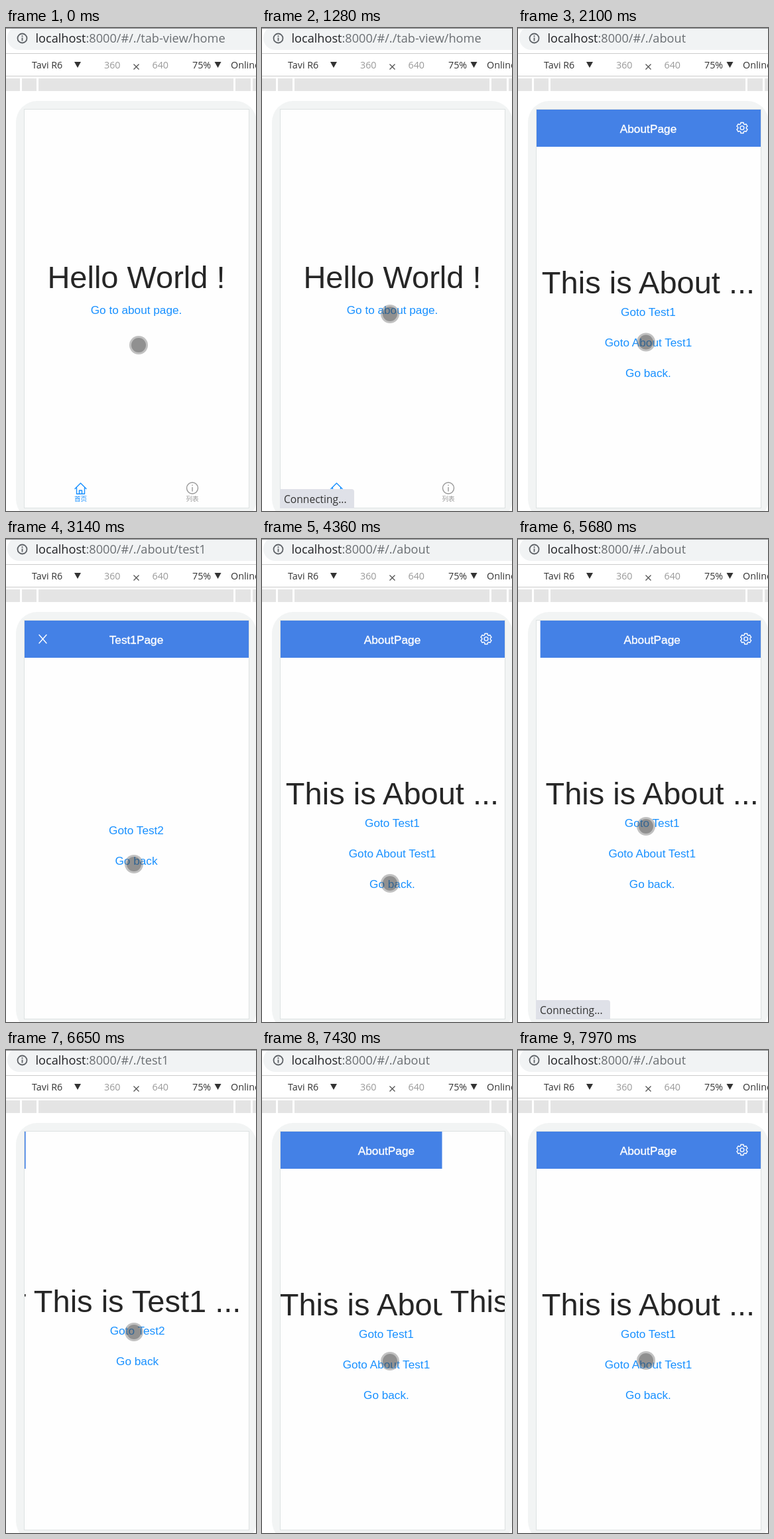
Recreate the animation shown at these times as an HTML page. Size 377 by 728 pixels, loop 8000 ms.

```html
<!DOCTYPE html>
<html lang="en">
<head>
<meta charset="utf-8">
<title>Page transitions</title>
<style>
  html, body { margin: 0; width: 100%; height: 100%; overflow: hidden; background: #fff; }
  svg { display: block; width: 100vw; height: 100vh; }
  text { white-space: pre; }
  .ui { font-family: "Open Sans", "Noto Sans", sans-serif; font-size: 14.3px; fill: #333; }
  .ui .dim { fill: #999; }
  .url { font-size: 18.15px; fill: #6a6e72; font-kerning: none; }
  .url .host { fill: #202124; }
  .page text { font-family: "Liberation Sans", Arial, sans-serif; text-anchor: middle; }
  .page .big { font-size: 47px; fill: #262626; }
  .page .link { font-size: 17.2px; fill: #1890ff; }
  .page .title { font-size: 17.3px; fill: #fff; stroke: #fff; stroke-width: .35; }
  .page .tab { font-family: "Noto Sans CJK SC", "Noto Sans CJK", sans-serif; font-size: 9.6px; font-weight: 500; }
  .icon { fill: none; stroke-width: 1.4; stroke-linejoin: round; stroke-linecap: round; }
</style>
</head>
<body>
<svg viewBox="0 0 377 728" preserveAspectRatio="none">
  <defs>
    <clipPath id="screen"><rect x="28" y="123" width="338" height="600"/></clipPath>
  </defs>
  <rect width="377" height="728" fill="#fff"/>

  <!-- Browser bar -->
  <rect x="2" y="-3" width="420" height="36" rx="18" fill="#f1f3f4"/>
  <rect width="377" height="1" fill="#85878a"/>
  <g fill="none" stroke="#5f6368" stroke-width="1.8">
    <circle cx="24.5" cy="15.5" r="7"/>
    <path d="M24.5 14.5v5M24.5 11.2v2"/>
  </g>
  <text class="ui url" x="44.5" y="22"><tspan class="host">localhost</tspan><tspan id="path"></tspan></text>

  <!-- Device toolbar -->
  <path d="M0 38.5H377M0 72.5H377" stroke="#cbcbcb"/>
  <g class="ui">
    <text x="39" y="61">Tavi R6</text>
    <text class="dim" x="148" y="61">360</text>
    <text class="dim" x="220.5" y="61">640</text>
    <text x="281" y="61">75%</text>
    <text x="339" y="61">Online</text>
    <path d="M103 51h10l-5 9zM314.5 51h10l-5 9z"/>
    <path d="M192.5 54.5l8 8m0-8l-8 8" stroke="#555" stroke-width="1.3"/>
  </g>
  <path d="M0 76h21v19H0zM24 76h22v19H24zM49 76h294v19H49zM346 76h23v19H346zM372 76h5v19h-5z" fill="#e4e4e4"/>

  <!-- Phone -->
  <rect x="15" y="110" width="363" height="632" rx="32" fill="#f2f4f4"/>
  <rect x="27.5" y="122.5" width="339" height="601" fill="#fefefe" stroke="#dde2e2"/>
  <g id="pages" clip-path="url(#screen)"></g>

  <g id="status" class="ui">
    <path d="M27 695h108q4 0 4 4v25H27z" fill="#dfe1e8"/>
    <text x="33" y="716" style="font-size:15.6px">Connecting...</text>
  </g>
  <g id="cursor">
    <circle r="14" fill="#787878" fill-opacity=".45"/>
    <circle r="11" fill="#000" fill-opacity=".25"/>
  </g>
</svg>

<script>
const LOOP = 8000, STEP = 60, SLIDE = 250, WIDTH = 338, PARALLAX = 0.096;
const $ = id => document.getElementById(id);

const text = (cls, y, str, x = 196.5, extra = '') =>
  `<text class="${cls}" x="${x}" y="${y}" ${extra}>${str}</text>`;
const link = (y, str) => text('link', y, str);
const header = (title, icon) =>
  `<rect x="28" y="123" width="338" height="56" fill="#4481e6"/>` +
  text('title', 158, title) + `<g class="icon" stroke="#fff">${icon}</g>`;

function gear(cx, cy) {
  const points = [];
  for (let tooth = 0; tooth < 6; tooth++) {
    for (const [turn, r] of [[-21, 6.4], [-14, 8.3], [14, 8.3], [21, 6.4]]) {
      const a = (tooth * 60 + 30 + turn) * Math.PI / 180;
      points.push(`${(cx + r * Math.cos(a)).toFixed(2)},${(cy + r * Math.sin(a)).toFixed(2)}`);
    }
  }
  return `<polygon points="${points.join(' ')}"/><circle cx="${cx}" cy="${cy}" r="2.9"/>`;
}

const tabs =
  `<path class="icon" stroke="#1890ff" d="M104 694.5l8.5-8.5 8.5 8.5M106.5 693v9.3h12V693M110.5 702v-5h4v5"/>` +
  text('tab', 713.3, '首页', 112.5, 'fill="#1890ff"') +
  `<g class="icon" stroke="#999"><circle cx="281" cy="693.5" r="8.5"/><path d="M281 692.5v5.5M281 689v.4"/></g>` +
  text('tab', 713.3, '列表', 281, 'fill="#999"');

// Listed from bottom to top of the stack.
const pages = {
  home: {
    path: 'tab-view/home',
    body: text('big', 392.3, 'Hello World !') + link(431, 'Go to about page.') + tabs
  },
  about: {
    path: 'about',
    body: header('AboutPage', gear(338, 150.5)) + text('big', 399.5, 'This is About ...') +
      link(434, 'Goto Test1') + link(480, 'Goto About Test1') + link(526, 'Go back.')
  },
  nested: {
    path: 'about/test1',
    body: header('Test1Page', '<path d="M50 144.5l11 12.5M61 144.5l-11 12.5"/>') +
      link(445, 'Goto Test2') + link(491, 'Go back')
  },
  test1: {
    path: 'test1',
    body: text('big', 394.5, 'This is Test1 ...') + link(429, 'Goto Test2') + link(475, 'Go back')
  }
};

$('pages').innerHTML = Object.entries(pages).map(([name, page]) =>
  `<g class="page" id="${name}"><rect x="28" y="123" width="338" height="600" fill="#fefefe"/>${page.body}</g>`
).join('');

// first visible step, time already elapsed by then, from, to
const slides = [
  [1400, 28, 'home', 'about'],
  [2470, 70, 'about', 'nested'],
  [3510, 70, 'nested', 'about'],
  [4600, 47, 'about', 'home'],
  [5500, 28, 'home', 'about'],
  [6470, 47, 'about', 'test1'],
  [7370, 47, 'test1', 'about']
];

// first step, last step, y at the end
const cursorMoves = [
  [680, 970, 431], [1870, 2100, 478], [3020, 3140, 490], [4120, 4360, 519],
  [4660, 5200, 433], [5920, 6100, 425], [6890, 7190, 469], [7670, 7790, 464], [7970, 7970, 468]
];

const statusTimes = [[1280, 1690], [5380, 5790]];

const names = Object.keys(pages);
const clamp = v => Math.min(1, Math.max(0, v));
const stepped = (t, start) => Math.floor((t - start) / STEP) * STEP;

// cubic-bezier(.25, .1, .25, 1)
function ease(x) {
  if (x <= 0 || x >= 1) return clamp(x);
  const curve = (s, a, b) => 3 * (1 - s) ** 2 * s * a + 3 * (1 - s) * s * s * b + s ** 3;
  let lo = 0, hi = 1;
  for (let i = 0; i < 20; i++) {
    const mid = (lo + hi) / 2;
    if (curve(mid, 0.25, 0.25) < x) lo = mid; else hi = mid;
  }
  return curve(lo, 0.1, 1);
}

function place(name, x) {
  $(name).setAttribute('transform', `translate(${x.toFixed(2)} 0)`);
  $(name).style.display = '';
}

function drawPages(t) {
  for (const name of names) $(name).style.display = 'none';
  const slide = slides.filter(s => s[0] <= t).pop();
  let current = 'home';
  if (!slide) place(current, 0);
  else {
    const [at, lead, from, to] = slide;
    const back = names.indexOf(from) > names.indexOf(to);
    const p = ease((stepped(t, at) + lead) / SLIDE);
    const cover = back ? 1 - p : p;
    const [upper, lower] = back ? [from, to] : [to, from];
    if (cover > 0) place(upper, WIDTH * (1 - cover));
    if (cover < 1) place(lower, -WIDTH * PARALLAX * cover);
    current = to;
  }
  const path = ':8000/#/./' + pages[current].path;
  if ($('path').textContent !== path) $('path').textContent = path;
}

function drawCursor(t) {
  let x = 200, y = 478;
  for (const [start, end, target] of cursorMoves) {
    if (t < start) break;
    const count = Math.round((end - start) / STEP) + 1;
    const p = clamp((stepped(t, start) / STEP + 1) / count);
    const k = (1 - Math.cos(Math.PI * p)) / 2;
    x += (193 - x) * k;
    y += (target - y) * k;
  }
  $('cursor').setAttribute('transform', `translate(${x.toFixed(1)} ${y.toFixed(1)})`);
}

function draw(t) {
  drawPages(t);
  drawCursor(t);
  $('status').style.display = statusTimes.some(([a, b]) => t >= a && t < b) ? '' : 'none';
}

const began = performance.now();
function tick() {
  draw((performance.now() - began) % LOOP);
  requestAnimationFrame(tick);
}
tick();
</script>
</body>
</html>
```
